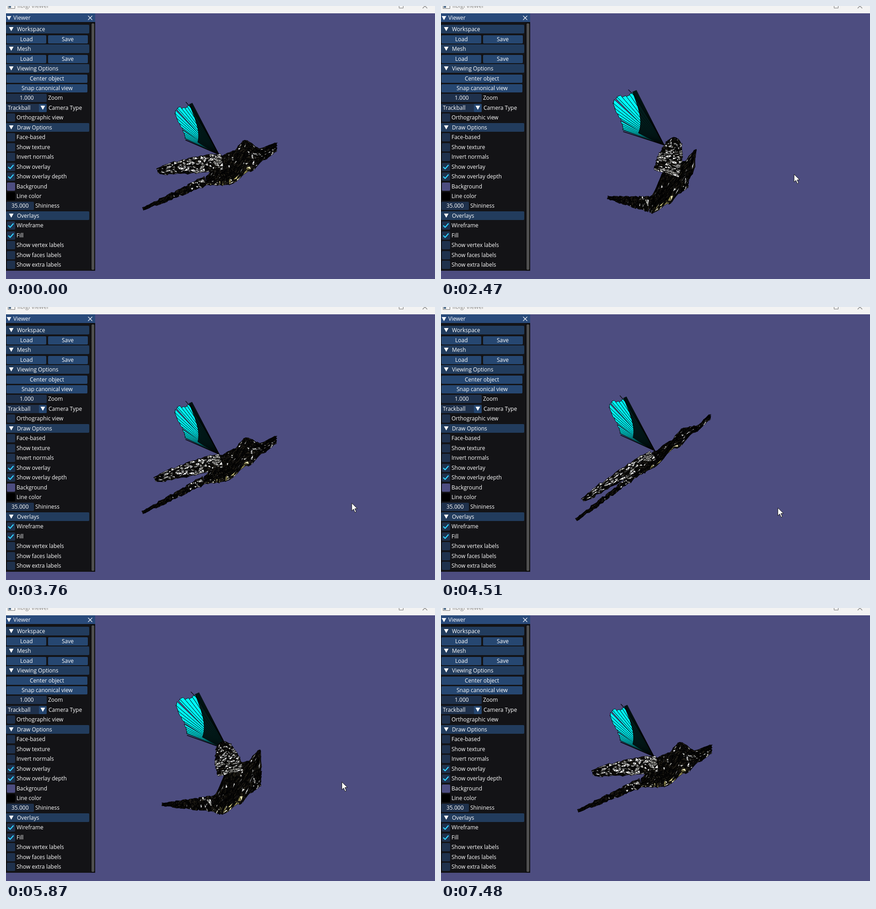
These frames come from a looping animation (938x597 px, 7610 ms). An HTML page with a canvas:

```html
<!DOCTYPE html>
<html lang="en">
<head>
<meta charset="utf-8">
<title>libigl viewer</title>
<style>
  html, body { margin: 0; width: 100%; height: 100%; overflow: hidden; background: #4d4d80; }
  canvas { display: block; width: 938px; height: 597px; }
</style>
</head>
<body>
<canvas id="stage" width="938" height="597"></canvas>
<script>
const W = 938, H = 597, LOOP = 7610;
const ctx = document.getElementById('stage').getContext('2d');

const clamp = (v, lo, hi) => Math.min(hi, Math.max(lo, v));
const smooth = k => k * k * (3 - 2 * k);
const mix = (a, b, k) => a + (b - a) * k;
const mixAll = (a, b, k) => a.map((v, i) => mix(v, b[i], k));
const down = ([x, y], dy) => [x, y + dy];
const dist = (a, b) => Math.hypot(a[0] - b[0], a[1] - b[1]);

function randomFrom(seed) {
  return () => {
    seed = (seed * 1664525 + 1013904223) >>> 0;
    return seed / 4294967296;
  };
}

// Where each landmark sits as the view tilts: 0 edge-on, 1 at rest, 2 raised, 3 steep.
const LANDMARKS = {
  tailTip:  [[296,467], [300,444], [300,449], [365,419]],
  hip:      [[422,368], [438,382], [445,418], [456,434]],
  wingTip:  [[308,426], [331,360], [402,302], [513,289]],
  shoulder: [[465,316], [468,328], [487,328], [500,345]],
  crest:    [[533,262], [524,293], [553,303], [560,313]],
  beak:     [[589,236], [592,308], [587,358], [541,380]],
  belly:    [[455,352], [490,390], [490,449], [465,451]],
  fanLeft:  [[366,213], [368,230], [362,208], [375,207]],
  fanRight: [[405,195], [407,212], [412,186], [427,184]],
  fanBase:  [[468,314], [466,325], [484,324], [488,304]]
};

// The drag: [time, pointer x, tilt]. Tilt below 0 only moves the pointer.
const DRAG = [
  [440,876,-4.4], [800,850,1], [1030,860,-.5], [1390,788,2], [1600,772,2.5],
  [2000,861,-2.7], [2470,772,3], [3100,815,-1.4], [3760,756,.75], [4100,803,.5],
  [4400,740,.8], [4580,735,-.3], [5240,705,2.45], [5600,720,3], [6080,744,2.4],
  [6480,785,-2.4], [6750,829,-3.3], [7080,846,-4.5]
];
const PRESS = 800, RELEASE = 6750, SETTLED = 7480;

function dragAt(t) {
  let i = 0;
  while (i < DRAG.length - 2 && t >= DRAG[i + 1][0]) i++;
  const [a, b] = [DRAG[i], DRAG[i + 1]];
  return mixAll(a, b, smooth(clamp((t - a[0]) / (b[0] - a[0]), 0, 1))).slice(1);
}

function tiltAt(t) {
  if (t < PRESS) return 1;
  if (t > RELEASE) return smooth(clamp((t - RELEASE) / (SETTLED - RELEASE), 0, 1));
  return clamp(dragAt(t)[1], 0, 3);
}

function landmarksAt(tilt) {
  const i = Math.min(2, Math.floor(tilt)), pose = {};
  for (const [name, spots] of Object.entries(LANDMARKS)) {
    pose[name] = mixAll(spots[i], spots[i + 1], tilt - i);
  }
  return pose;
}

function path(points, close = true) {
  ctx.beginPath();
  points.forEach(([x, y], i) => i ? ctx.lineTo(x, y) : ctx.moveTo(x, y));
  if (close) ctx.closePath();
}

function fillPath(points, color) {
  path(points);
  ctx.fillStyle = color;
  ctx.fill();
}

function line(a, b, width = 1, color = '#000') {
  path([a, b], false);
  ctx.lineWidth = width;
  ctx.strokeStyle = color;
  ctx.stroke();
}

const DARK = ['#0d0c09', '#1a1711', '#080807', '#27231a'];
const LIGHT = ['#ffffff', '#ececea', '#cfcfca', '#96958f'];
const WARM = ['#efe9b4', '#cfc67c', '#8f8850', '#fbf8e0'];

function makeMesh(cols, rows, seed, shade) {
  const rnd = randomFrom(seed), verts = [], faces = [];
  const pick = list => list[Math.floor(rnd() * list.length)];
  const spread = (i, n) => (i + (i > 0 && i < n ? (rnd() - .5) * .7 : 0)) / n;
  for (let j = 0; j <= rows; j++) {
    for (let i = 0; i <= cols; i++) {
      verts.push({
        u: spread(i, cols), v: spread(j, rows),
        dx: (rnd() - .5) * 3, dy: (rnd() - .5) * 3
      });
    }
  }
  for (let j = 0; j < rows; j++) {
    for (let i = 0; i < cols; i++) {
      const a = j * (cols + 1) + i, b = a + 1, c = a + cols + 1, d = c + 1;
      const [chance, tones] = shade(i / cols, j / rows);
      for (const ids of rnd() < .5 ? [[a, b, c], [b, d, c]] : [[a, b, d], [a, d, c]]) {
        faces.push({ ids, color: pick(rnd() < chance ? tones : DARK) });
      }
    }
  }
  return { verts, faces };
}

// Light faces gather in patches.
const patchy = (u, v) => Math.sin(u * 21 + 2 * Math.sin(v * 7)) * Math.sin(v * 10 + u * 6) > 0;

const MESHES = {
  tail: makeMesh(28, 4, 11, u => [u > .7 ? .35 : .06, LIGHT]),
  body: makeMesh(30, 14, 5, (u, v) => {
    if (v > .82 && u < .6) return [.5, WARM];
    if (u > .62 && v > .4) return [patchy(u, v) ? .6 : .12, LIGHT];
    return [patchy(u, v) ? .07 : .02, LIGHT];
  }),
  wing: makeMesh(22, 8, 23, (u, v) =>
    [u > .8 && v < .6 ? .9 : u > .1 && patchy(u, v) ? .75 : .25, LIGHT])
};

function drawMesh({ verts, faces }, stations) {
  const spans = stations.length - 1;
  const pts = verts.map(({ u, v, dx, dy }) => {
    const i = Math.min(spans - 1, Math.floor(u * spans)), k = u * spans - i;
    const [x, y] = [0, 1].map(n => {
      const edge = side => mix(stations[i][side][n], stations[i + 1][side][n], n ? smooth(k) : k);
      return mix(edge(0), edge(1), v);
    });
    return [x + dx, y + dy];
  });
  ctx.strokeStyle = '#000';
  ctx.lineWidth = .75;
  for (const { ids, color } of faces) {
    fillPath(ids.map(i => pts[i]), color);
    ctx.stroke();
  }
}

// A straight limb whose half width follows a profile along its length.
function ribbon(a, b, halfWidth) {
  const length = dist(a, b), nx = (b[1] - a[1]) / length, ny = (a[0] - b[0]) / length;
  return Array.from({ length: 11 }, (_, i) => {
    const [x, y] = mixAll(a, b, i / 10), w = halfWidth(i / 10);
    return [[x + nx * w, y + ny * w], [x - nx * w, y - ny * w]];
  });
}

function bodyStations({ hip, shoulder, crest, beak, belly }, depth) {
  return [
    [down(hip, -.15 * depth), down(hip, .15 * depth)],
    [shoulder, down(mixAll(hip, belly, .5), .1 * depth)],
    [down(mixAll(shoulder, crest, .5), .1 * depth), belly],
    [crest, down(mixAll(belly, beak, .45), .12 * depth)],
    [down(mixAll(crest, beak, .45), .18 * depth), down(mixAll(belly, beak, .75), .1 * depth)],
    [down(beak, -.12 * depth), down(beak, .15 * depth)]
  ];
}

function drawBird(pose) {
  const { tailTip, hip, wingTip, shoulder, belly } = pose;
  const depth = dist(shoulder, belly);
  const wingRoot = mixAll(shoulder, belly, .2);
  drawMesh(MESHES.tail, ribbon(tailTip, hip, u => mix(3, .15 * depth, u)));
  drawMesh(MESHES.body, bodyStations(pose, depth));
  drawMesh(MESHES.wing, ribbon(wingTip, wingRoot,
    u => (4 + .22 * depth) * Math.min(1, .25 + .9 * Math.sqrt(u))));
}

// Fan points are polar: a sweeps from the right edge (0) past the left tip (1).
const outerReach = a => a < 1 ? 1 : a ** -.85;
const innerReach = a => a > 2 ? .12 : Math.min(1, .46 * a ** -.42);

function drawFan({ fanLeft, fanRight, fanBase }) {
  const rnd = randomFrom(8);
  const at = (a, r) => mixAll(fanBase, mixAll(fanRight, fanLeft, a), r);
  const first = .165, step = .15, count = 15;
  const angles = Array.from({ length: count + 1 }, (_, i) => first + i * step);
  const inner = angles.map(a => at(a, innerReach(a)));
  ctx.lineJoin = 'round';
  fillPath([fanBase, at(0, 1), at(first, 1), ...inner], '#021c1c');
  for (let i = 0; i < count; i++) {
    const a = angles[i], b = angles[i + 1], ragged = .97 + rnd() * .06;
    const gap = i % 5 === 4 ? .5 : 1;
    const end = mix(a, b, gap);
    fillPath([inner[i], at(a, outerReach(a) * ragged), at(end, outerReach(end) * ragged), inner[i + 1]], '#00f8fa');
    ctx.strokeStyle = '#000';
    ctx.lineWidth = .9;
    ctx.stroke();
    line(at(a, innerReach(a)), fanBase, .6);
  }
  for (let i = 0; i < 4; i++) line(at(i * .05, 1), fanBase, .9);
  line(at(2.5, .47), fanBase, 1.5);
  line(at(.25, 1.06), at(.17, .92), 1.2);
}

function box(x, y, w, h, color, radius = 2) {
  ctx.beginPath();
  ctx.roundRect(x, y, w, h, radius);
  ctx.fillStyle = color;
  ctx.fill();
}

function label(text, x, y, centered = false, color = '#fff', size = 12) {
  ctx.font = `${size}px "Open Sans", "Noto Sans", sans-serif`;
  ctx.fillStyle = color;
  const left = centered ? x - ctx.measureText(text).width / 2 : x;
  ctx.fillText(text, Math.round(left), y + 4);
}

const arrow = (x, y) => fillPath([[x - 5, y - 4], [x + 5, y - 4], [x, y + 5]], '#fff');

function cross(x, y, r, color) {
  line([x - r, y - r], [x + r, y + r], 1.1, color);
  line([x - r, y + r], [x + r, y - r], 1.1, color);
}

const HEADER = '#223c5d', BUTTON = '#264771', FIELD = '#1f314c';
const button = (text, x, w, y) => { box(x, y - 9, w, 18, BUTTON); label(text, x + w / 2, y, true); };
const header = text => y => { box(0, y - 10, 182, 19, HEADER); arrow(11.5, y - 1); label(text, 24, y); };
const pair = y => { button('Load', 1, 87, y); button('Save', 92, 87, y); };
const wide = text => y => button(text, 1, 177, y);
const field = (value, w, text) => y => {
  box(1, y - 9, w, 18, FIELD);
  label(value, 1 + w / 2, y, true);
  label(text, w + 4, y);
};
const swatch = (text, color) => y => { box(2, y - 9, 18, 18, color); label(text, 23, y); };
const check = (text, on) => y => {
  swatch(text, FIELD)(y);
  if (!on) return;
  path([[5, y], [9, y + 4], [16.5, y - 4.5]], false);
  ctx.lineWidth = 2.4;
  ctx.strokeStyle = '#2fd0ff';
  ctx.stroke();
};
const combo = y => {
  box(0, y - 9, 89, 18, FIELD);
  box(72, y - 9, 17, 18, BUTTON);
  arrow(80.5, y - 1);
  label('Trackball', 4, y);
  label('Camera Type', 93, y);
};

const ROWS = [
  header('Workspace'), pair, header('Mesh'), pair,
  header('Viewing Options'), wide('Center object'), wide('Snap canonical view'),
  field('1.000', 88, 'Zoom'), combo, check('Orthographic view'),
  header('Draw Options'), check('Face-based'), check('Show texture'), check('Invert normals'),
  check('Show overlay', true), check('Show overlay depth', true),
  swatch('Background', '#4d4d80'), swatch('Line color', '#000'), field('35.000', 60, 'Shininess'),
  header('Overlays'), check('Wireframe', true), check('Fill', true),
  check('Show vertex labels'), check('Show faces labels'), check('Show extra labels')
];

function drawWindow() {
  box(0, 0, W, 16, '#f3f3f3', 0);
  ctx.lineWidth = 1;
  ctx.strokeStyle = '#777';
  ctx.strokeRect(4.5, -6.5, 15, 12);
  box(6, 0, 5, 4, '#53718f', 0);
  label('libigl viewer', 25, 0, false, '#8b8b8b', 12.7);
  ctx.strokeRect(859.5, -4.5, 9, 9);
  cross(916, 0, 5, '#777');
}

function drawPanel() {
  box(0, 16, 195, 563, '#131316', 0);
  box(0, 16, 195, 19, '#294a7a', 0);
  arrow(6.5, 26);
  label('Viewer', 16, 26);
  cross(184, 26, 4.5, '#fff');
  box(185, 36, 10, 543, '#0d0d0f', 0);
  box(187, 38, 6, 539, '#4f4f4f');
  ROWS.forEach((row, i) => row(Math.round(51.2 + i * 21.46)));
}

function drawPointer(t) {
  const [x, tilt] = dragAt(t);
  const y = 440 - 12 * tilt - 4 * tilt * Math.abs(tilt);
  const shape = [[0,0], [0,17], [4,13.3], [7,20.5], [9.7,19.3], [6.7,12.3], [12,12]];
  fillPath(shape.map(([dx, dy]) => [x + dx, y + dy]), '#fff');
  ctx.lineWidth = 1;
  ctx.strokeStyle = '#111';
  ctx.stroke();
}

function draw(t) {
  ctx.fillStyle = '#4d4d80';
  ctx.fillRect(0, 0, W, H);
  const pose = landmarksAt(tiltAt(t));
  drawFan(pose);
  drawBird(pose);
  drawWindow();
  drawPanel();
  if (t >= 440 && t < 7080) drawPointer(t);
}

const start = performance.now();
function tick() {
  draw((performance.now() - start) % LOOP);
  requestAnimationFrame(tick);
}
tick();
</script>
</body>
</html>
```
